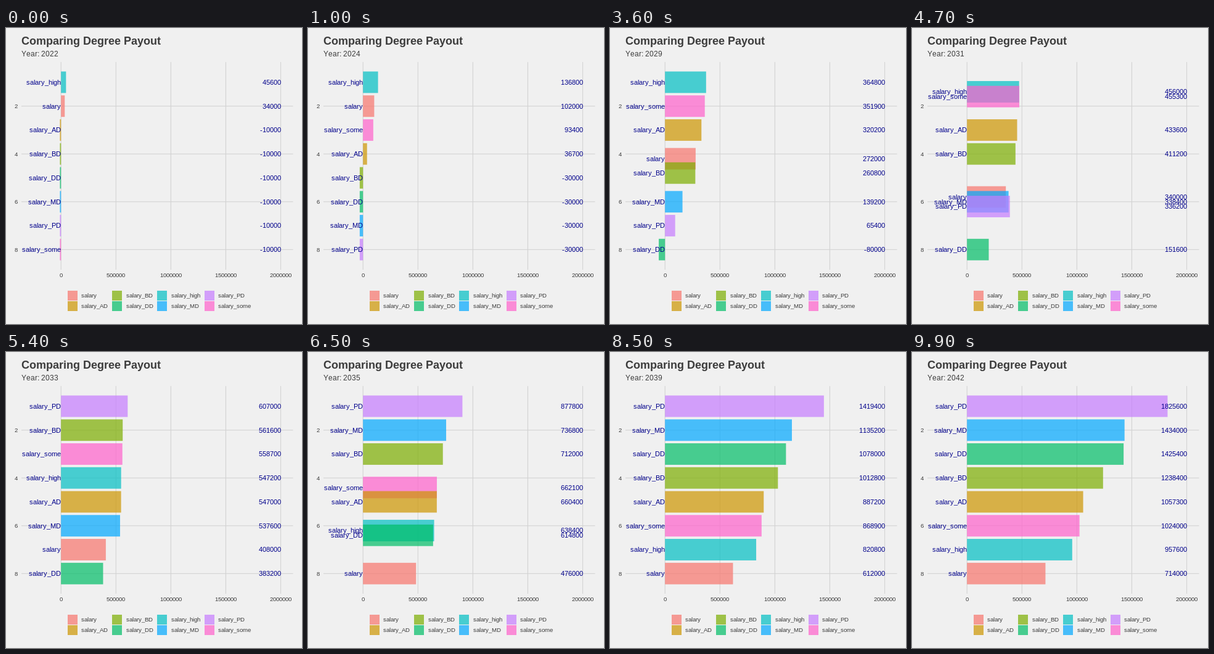
An HTML page with a canvas for the animation above (10 s loop, 480 by 480 pixels).

```html
<!DOCTYPE html>
<html lang="en">
<head>
<meta charset="utf-8">
<title>Comparing Degree Payout</title>
<style>
  html, body { margin: 0; width: 100%; height: 100%; overflow: hidden; background: #f0f0f0; }
  canvas { display: block; width: 480px; height: 480px; }
</style>
</head>
<body>
<canvas id="stage" width="480" height="480"></canvas>
<script>
const ctx = document.getElementById('stage').getContext('2d');
const FAMILY = '"Liberation Sans", Arial, sans-serif';
const INK = '#3c3c3c', NAVY = '#00008b', GRID = '#d2d2d2', PAPER = '#f0f0f0';
const FRAMES = 100, STEP = 100, YEARS = 20, FIRST = 2022;

// Each study year costs 10000; afterwards the pay adds up.
const series = [
  ['salary', '#f8766d', 0, 34000],
  ['salary_AD', '#cd9600', 2, 56700],
  ['salary_BD', '#7cae00', 4, 75200],
  ['salary_DD', '#00be67', 8, 115800],
  ['salary_high', '#00bfc4', 0, 45600],
  ['salary_MD', '#00a9ff', 6, 99600],
  ['salary_PD', '#c77cff', 7, 135400],
  ['salary_some', '#ff61cc', 1, 51700]
].map(([name, color, study, pay]) => ({ name, color, study, pay }));

const total = (s, n) => -10000 * Math.min(n, s.study) + s.pay * Math.max(0, n - s.study);

const years = Array.from({ length: YEARS + 1 }, (_, i) => {
  const values = series.map(s => total(s, i + 1));
  const order = series.map((_, k) => k).sort((a, b) => values[b] - values[a] || a - b);
  const ranks = series.map((_, k) => order.indexOf(k) + 1);
  return { values, order, ranks, key: Math.round((FRAMES - 1) * i / YEARS) };
});

const px = v => 89.2 + v * 356.3 / 2e6;
const py = rank => 49.2 + 38.76 * rank;
const lerp = (a, b, p) => a + (b - a) * p;

// Whole-pixel glyph advances; align is 0 (left), 0.5 or 1 (right).
function text(str, x, y, size, color, align = 0, weight = '') {
  ctx.font = `${weight} ${size}px ${FAMILY}`;
  ctx.fillStyle = color;
  const widths = [...str].map(c => Math.round(ctx.measureText(c).width));
  let pen = Math.round(x - align * widths.reduce((a, b) => a + b, 0));
  [...str].forEach((c, i) => {
    ctx.fillText(c, pen, Math.round(y));
    pen += widths[i];
  });
}

function box(x, y, w, h, color) {
  ctx.globalAlpha = 0.7;
  ctx.fillStyle = color;
  ctx.fillRect(x, y, w, h);
  ctx.globalAlpha = 1;
}

function drawAxes() {
  for (let rank = 2; rank <= 8; rank += 2) {
    ctx.fillStyle = GRID;
    ctx.fillRect(25, py(rank) - 0.53, 440.5, 1.07);
    text(String(rank), 19, py(rank) + 3.4, 9.6, INK, 1);
  }
  for (let v = 0; v <= 2e6; v += 5e5) {
    ctx.fillStyle = GRID;
    ctx.fillRect(px(v) - 0.53, 55.2, 1.07, 336.8);
    text(String(v), px(v), 404, 9.6, INK, 0.5);
  }
}

function drawLegend() {
  const keys = [100, 172, 245, 322], labels = [122, 195, 268, 344];
  series.forEach((s, i) => {
    const col = i >> 1, row = i % 2;
    box(keys[col], 426 + 17 * row, 16, 16, s.color);
    text(s.name, labels[col], 437 + 17 * row, 9.6, INK);
  });
}

function drawBars(frame) {
  let i = 0;
  while (i < YEARS && years[i + 1].key <= frame) i++;
  const from = years[i], to = years[Math.min(i + 1, YEARS)];
  const p = to === from ? 0 : (frame - from.key) / (to.key - from.key);
  const shown = p < 0.5 ? from : to;
  const place = k => py(lerp(from.ranks[k], to.ranks[k], p));

  for (const k of from.order) {
    const end = px(lerp(from.values[k], to.values[k], p));
    const left = Math.min(px(0), end), right = Math.max(px(0), end);
    box(left, place(k) - 17.44, right - left, 34.88, series[k].color);
  }
  for (const k of from.order) {
    const base = place(k) + 3.9;
    text(series[k].name, px(0), base, 11.04, NAVY, 1);
    text(String(shown.values[k]), px(2e6), base, 11.04, NAVY, 1);
  }
}

function draw(frame) {
  ctx.fillStyle = PAPER;
  ctx.fillRect(0, 0, 480, 480);
  text('Comparing Degree Payout', 25, 27, 18, INK, 0, 'bold');
  text('Year: ' + Math.round(FIRST + frame * YEARS / (FRAMES - 1)), 25, 46, 12, INK);
  drawAxes();
  drawBars(frame);
  drawLegend();
}

const start = performance.now();
let last = -1;
function tick() {
  const frame = Math.floor((performance.now() - start) / STEP) % FRAMES;
  if (frame !== last) draw(last = frame);
  requestAnimationFrame(tick);
}
tick();
</script>
</body>
</html>
```
